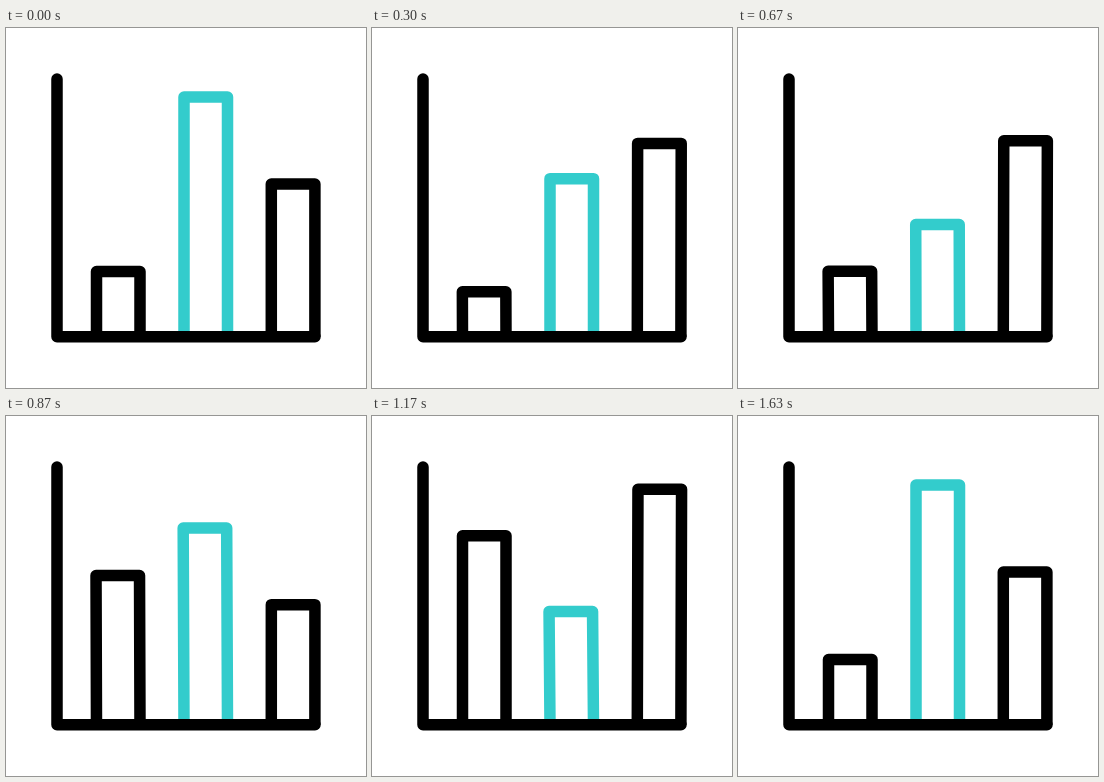
An HTML page for the animation above (2000 ms loop, 360 by 360 pixels).

```html
<!DOCTYPE html>
<html lang="en">
<head>
<meta charset="utf-8">
<title>Bar chart</title>
<style>
  html, body { margin: 0; width: 100%; height: 100%; overflow: hidden; background: #fff; }
  svg { display: block; width: 100%; height: 100%; }
  path { fill: none; stroke: #000; stroke-width: 11.5; stroke-linejoin: round; }
  .accent { stroke: #33cccc; }
  .axis { stroke-linecap: round; }
</style>
</head>
<body>
<svg viewBox="0 0 360 360">
  <path class="bar"/>
  <path class="bar accent"/>
  <path class="bar"/>
  <path class="axis" d="M51 51V308.7H309"/>
</svg>
<script>
const LOOP = 2000;
const LAST_STEP = 49;
const BASE = 308.7;

// Key poses in steps of 1/30 s; each bar eases linearly between its tops.
const keySteps = [2, 17, 25.6, 34.3, 48.8];
const bars = [
  { left: 90.5, right: 134, tops: [243.5, 287, 161.8, 113.5, 243.5], lean: [0, -.3, -.5, 0, 0] },
  { left: 178, right: 221.5, tops: [69, 244, 107.7, 202, 69], lean: [0, 0, -.8, -1, 0] },
  { left: 265.3, right: 308.9, tops: [156, 69, 194.4, 69, 156], lean: [0, .7, 0, .7, 0] }
];
const paths = document.querySelectorAll('.bar');

function interpolate(values, step) {
  if (step <= keySteps[0]) return values[0];
  const next = keySteps.findIndex(key => key > step);
  if (next < 0) return values[values.length - 1];
  const from = keySteps[next - 1];
  const progress = (step - from) / (keySteps[next] - from);
  return values[next - 1] + (values[next] - values[next - 1]) * progress;
}

// Step starts are rounded to 10 ms; the final pose holds to the end of the loop.
function stepAt(time) {
  return Math.min(LAST_STEP, Math.floor(Math.floor(time / 10) * .3 + .15));
}

function draw(time) {
  const step = stepAt(time % LOOP);
  bars.forEach(({ left, right, tops, lean }, i) => {
    const top = interpolate(tops, step);
    const dx = interpolate(lean, step);
    paths[i].setAttribute('d',
      `M${left} ${BASE}L${left + dx} ${top}H${right + dx}L${right} ${BASE}`);
  });
}

const start = performance.now();
function tick(now) {
  draw(Math.max(0, now - start));
  requestAnimationFrame(tick);
}
draw(0);
requestAnimationFrame(tick);
</script>
</body>
</html>
```
